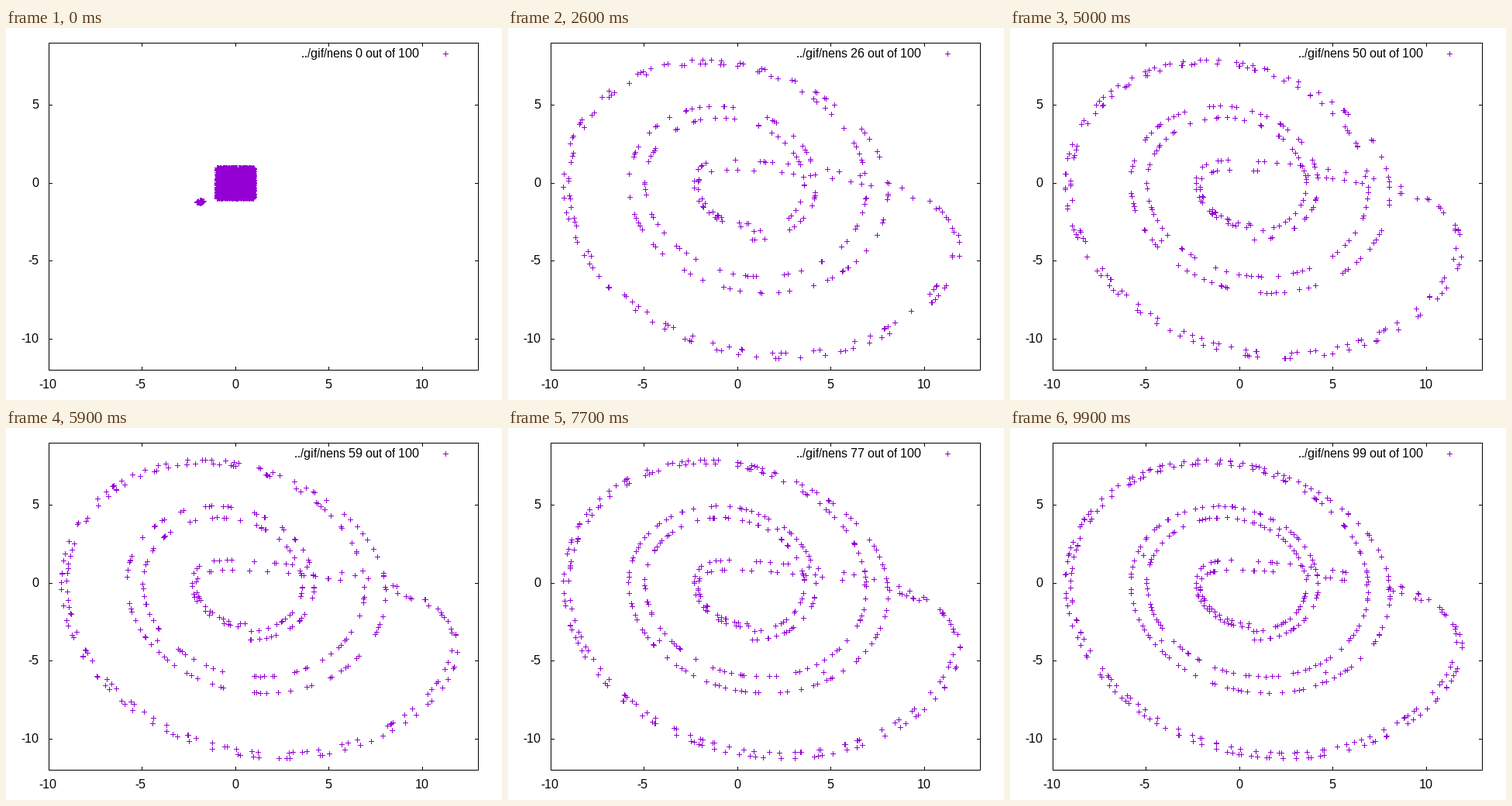
A matplotlib script that plays this animation: 640x480 px, repeating every 10 s.

```python
import numpy as np
import matplotlib.pyplot as plt
from matplotlib.animation import FuncAnimation

W, H, DPI = 640, 480, 100
PX = 72 / DPI
FRAMES = 100
PURPLE = "#9400d3"
LEFT, RIGHT, TOP, BOTTOM = 55, 609, 19, 441
TICK = 5
A, B, C = 0.22, 0.2, 5.7        # Rössler parameters
GOLDEN = (5 ** 0.5 - 1) / 2

plt.rcParams.update({"font.family": "Liberation Sans",
                     "text.hinting": "native",
                     "text.hinting_factor": 1})


def flow(p):
    x, y, z = p
    return np.array([-y - z, x + A * y, B + z * (x - C)])


def three_turns(depth, dt=0.01, limit=3000):
    """Follow the flow from one lowest point at -depth to the third one after."""
    p = np.array([A * depth, -depth, B / C])
    path, minima, climb = [p[:2]], 0, 0
    while minima < 3 and len(path) < limit:
        k1 = flow(p)
        k2 = flow(p + dt / 2 * k1)
        k3 = flow(p + dt / 2 * k2)
        k4 = flow(p + dt * k3)
        p = p + dt / 6 * (k1 + 2 * k2 + 2 * k3 + k4)
        path.append(p[:2])
        before, climb = climb, p[0] + A * p[1]
        minima += before < 0 <= climb
    return np.array(path)


class Strand:
    """A path that can be sampled by phase 0..1, slower parts more densely."""

    def __init__(self, path):
        self.path = path
        step = np.hypot(*np.diff(path, axis=0).T)
        self.phase = np.r_[0, np.cumsum(step ** 0.6)]
        self.phase /= self.phase[-1]

    def at(self, phase):
        return np.c_[tuple(np.interp(phase % 1, self.phase, axis)
                           for axis in self.path.T)]


# The stable orbit closes after six turns; an unstable one runs in between.
ORBIT = Strand(np.vstack([three_turns(3.64), three_turns(3.09)]))
MIDDLE = Strand(three_turns(3.4))


def start_cloud():
    rng = np.random.default_rng(1)
    block = rng.uniform(-1, 1, (4000, 2))
    u, v = rng.uniform(-1, 1, (2, 50))
    blob = np.c_[-1.88 + 0.2 * u, -1.2 + 0.03 * u + 0.12 * v * (1 - abs(u))]
    return np.vstack([block, blob])


def cloud(i):
    if i == 0:
        return start_cloud()
    rng = np.random.default_rng(100 + i)
    k = np.arange(int(290 + 2.4 * i))
    roaming = k >= 4 * (i - 20)
    pts = ORBIT.at(k * GOLDEN + roaming * rng.normal(0, 0.003, len(k)))
    pts += rng.normal(0, 0.25 * np.exp(-i / 3), pts.shape)
    strays = MIDDLE.at(np.arange(max(0, (i - 45) // 5)) * GOLDEN + 0.25)
    return np.vstack([pts, strays])


def to_px(pts):
    x = LEFT + (pts[:, 0] + 10) * (RIGHT - LEFT) / 23
    y = TOP + (9 - pts[:, 1]) * (BOTTOM - TOP) / 21
    return np.rint(x), np.rint(y)


def crosses(x, y):
    """Seven-pixel plus signs as one NaN-separated polyline."""
    gap = np.full_like(x, np.nan)
    xs = np.c_[x - 3, x + 4, gap, x + .5, x + .5, gap]
    ys = np.c_[y + .5, y + .5, gap, y - 3, y + 4, gap]
    return xs.ravel(), ys.ravel()


fig = plt.figure(figsize=(W / DPI, H / DPI), dpi=DPI, facecolor="white")
ax = fig.add_axes([0, 0, 1, 1])
ax.set(xlim=(0, W), ylim=(H, 0))
ax.axis("off")


def line(xs, ys, color="black", z=2):
    return ax.plot(xs, ys, color=color, lw=PX, snap=False, zorder=z,
                   solid_capstyle="butt", solid_joinstyle="miter")[0]


def label(x, y, s, ha):
    return ax.text(x, y, s, ha=ha, va="baseline", fontsize=16 * PX, zorder=4)


l, r, t, b = LEFT + .5, RIGHT + .5, TOP + .5, BOTTOM + .5
line([l, r, r, l, l, r], [t, t, b, b, t, t])

for v in range(-10, 11, 5):
    (x,), (y,) = to_px(np.array([[v, v]]))
    for edge, inner in ((TOP, TOP + TICK), (BOTTOM + 1, BOTTOM + 1 - TICK)):
        line([x + .5, x + .5], [edge, inner])
    label(x - (1.5 if v < 0 else 0), 465, str(v), "center")
    if v < 9:
        for edge, inner in ((LEFT, LEFT + TICK), (RIGHT + 1, RIGHT + 1 - TICK)):
            line([edge, inner], [y + .5, y + .5])
        label(42, y + 5, str(v), "right")

dots = line([], [], PURPLE, 3)
line(*crosses(np.array([567.]), np.array([33.])), PURPLE, 3)
title = label(533, 38, "", "right")


def update(i):
    dots.set_data(*crosses(*to_px(cloud(i))))
    title.set_text(f"../gif/nens {i} out of 100")
    return dots, title


anim = FuncAnimation(fig, update, frames=FRAMES, interval=1000 // 10,
                     repeat=True, repeat_delay=0, blit=False)
plt.show()
```
